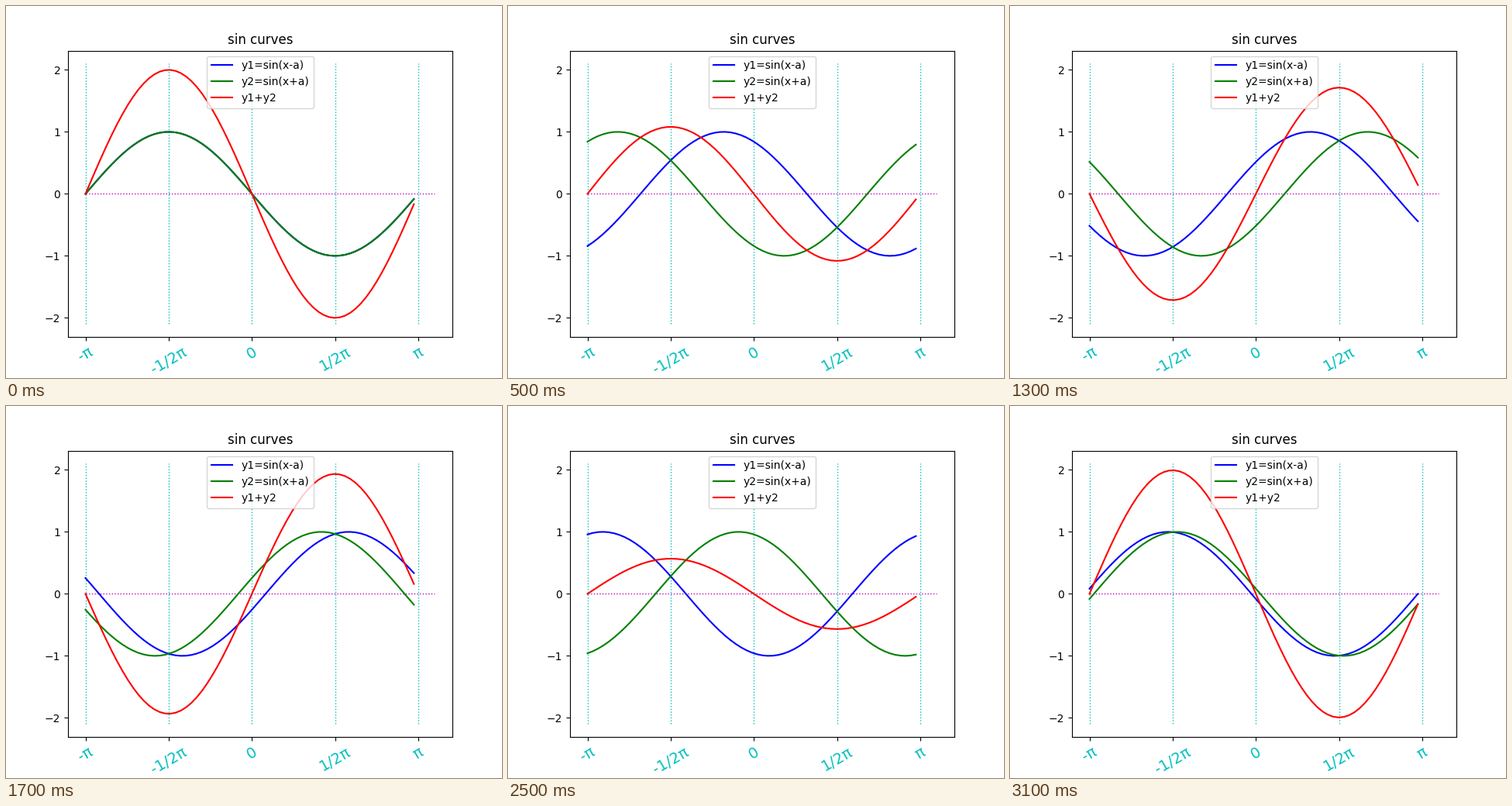
A matplotlib script that plays this animation: 640 px wide and 480 px high, repeating every 3200 ms.

```python
import numpy as np
import matplotlib.pyplot as plt
from matplotlib.animation import FuncAnimation

PI = np.pi
STEP = 0.2
FRAMES = 32
X_END = 1.1 * PI
Y_END = 2.1

plt.rcParams["font.family"] = "DejaVu Sans"

fig, ax = plt.subplots(figsize=(6.4, 4.8), dpi=100)
x = np.arange(-PI, PI, 0.1)
ticks = np.linspace(-PI, PI, 5)

ax.set_title("sin curves")
ax.hlines(0, -PI, X_END, colors="m", linestyles="dotted", linewidth=1)
ax.vlines(ticks, -Y_END, Y_END, colors="c", linestyles="dotted", linewidth=1)

pad = 0.05 * (X_END + PI)
ax.set_xlim(-PI - pad, X_END + pad)
ax.set_ylim(-1.1 * Y_END, 1.1 * Y_END)
ax.set_xticks(ticks, ["-π", "-1/2π", "0", "1/2π", "π"],
              color="c", fontsize=14, rotation=30)
ax.set_yticks(range(-2, 3))

minus, = ax.plot(x, x * 0, "b", label="y1=sin(x-a)")
plus, = ax.plot(x, x * 0, "g", label="y2=sin(x+a)")
total, = ax.plot(x, x * 0, "r", label="y1+y2")
ax.legend(loc="upper center")


def update(i):
    a = -PI + STEP * i
    y1, y2 = np.sin(x - a), np.sin(x + a)
    minus.set_ydata(y1)
    plus.set_ydata(y2)
    total.set_ydata(y1 + y2)
    return minus, plus, total


anim = FuncAnimation(fig, update, frames=FRAMES, interval=100,
                     init_func=lambda: update(0), repeat=True)
plt.show()
```
